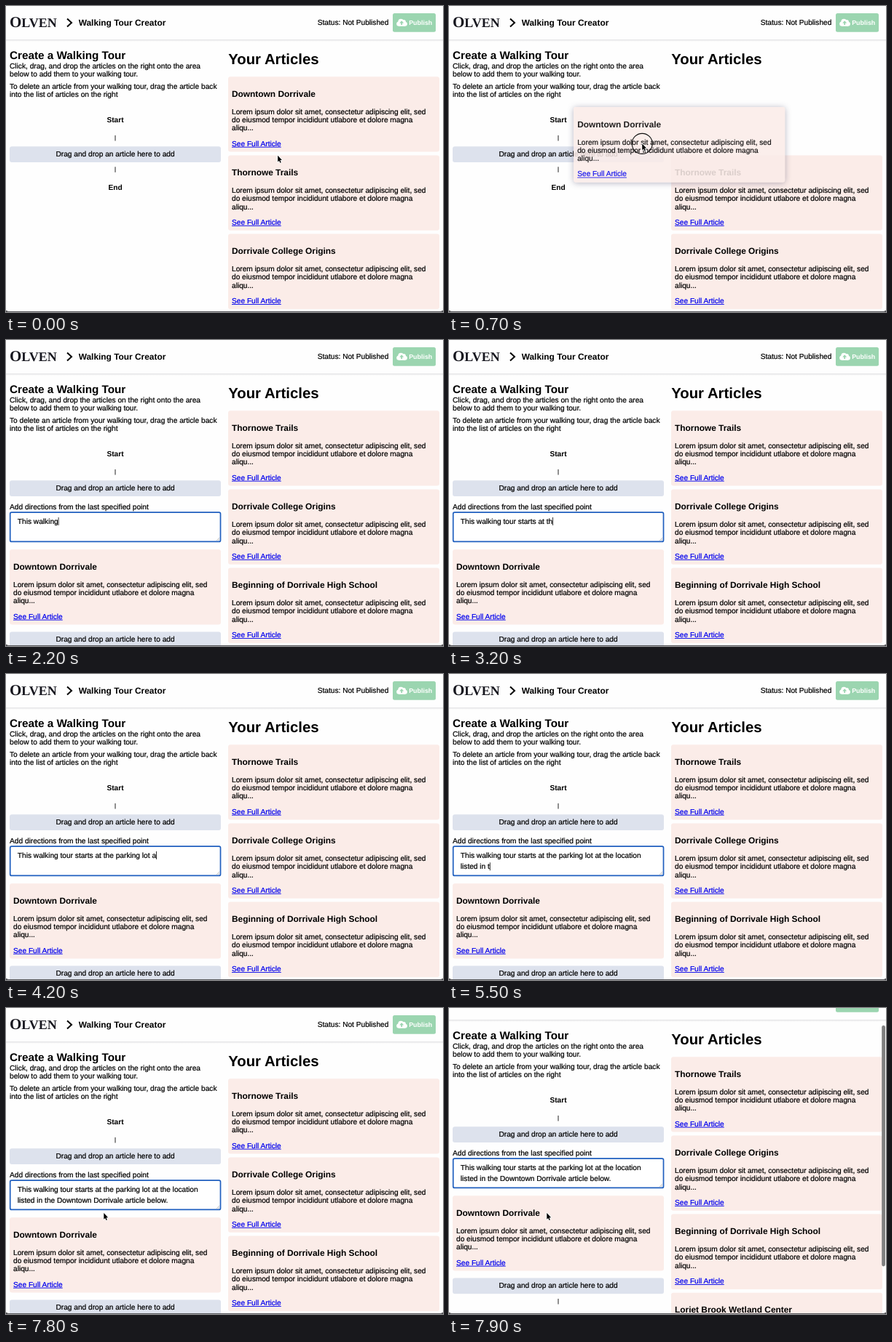
Recreate the animation shown at these times as an HTML page with a canvas. Size 600 by 421 pixels, loop 8000 ms.

```html
<!DOCTYPE html>
<html lang="en">
<head>
<meta charset="utf-8">
<title>Walking Tour Creator</title>
<style>
html, body { margin: 0; width: 100%; height: 100%; overflow: hidden; background: #fefefe; }
canvas { display: block; }
</style>
</head>
<body>
<canvas id="stage" width="600" height="421"></canvas>
<script>
const ctx = document.getElementById('stage').getContext('2d');
const LOOP = 8000;
const SANS = '"Liberation Sans", Arial, sans-serif';
const SERIF = '"Liberation Serif", serif';
const BODY = 10.17, TITLE = 11.9;
const COLORS = { page: '#fefefe', card: '#fbece8', zone: '#dde2ed', link: '#0000ee', focus: '#1f5fbf', button: '#9bd5b0' };

const ARTICLES = [
  'Downtown Dorrivale',
  'Thornowe Trails',
  'Dorrivale College Origins',
  'Beginning of Dorrivale High School',
  'Loriet Brook Wetland Center'
];
const LOREM = [
  'Lorem ipsum dolor sit amet, consectetur adipiscing elit, sed',
  'do eiusmod tempor incididunt utlabore et dolore magna',
  'aliqu...'
];
const LINE1 = 'This walking tour starts at the parking lot at the location ';
const LINE2 = 'listed in the Downtown Dorrivale article below.';

// [time, value...] keys, linear in between
const TYPED = [[1700, 0], [2200, 12], [3900, 44], [4100, 44], [4200, 45], [5000, 60], [5100, 65], [5200, 65],
  [5300, 67], [5500, 71], [5600, 74], [5700, 74], [5900, 78], [6000, 78], [6900, 97], [7600, 107]];
const POINTER = [[0, 373, 206], [200, 399, 148], [300, 392, 150], [700, 265.7, 189.3], [900, 170, 206],
  [1100, 165, 210], [1500, 134, 258], [1700, 134, 258]];
const GRAB = { from: 200, to: 1000, dx: -94, dy: -50.3 };
const FOCUS_AT = 1500, TYPE_AT = 1800, RETURN_AT = 7800, SCROLL_AT = 7900;

function track(keys, t) {
  if (t <= keys[0][0]) return keys[0].slice(1);
  for (let i = 1; i < keys.length; i++) {
    const a = keys[i - 1], b = keys[i];
    if (t <= b[0]) {
      const k = (t - a[0]) / (b[0] - a[0]);
      return a.slice(1).map((v, j) => v + (b[j + 1] - v) * k);
    }
  }
  return keys[keys.length - 1].slice(1);
}

// A hairline stroke gives the slightly heavier weight of smoothed text
function text(str, x, y, { size = BODY, bold = false, color = '#000', align = 'left', face = SANS } = {}) {
  ctx.font = `${bold ? 'bold ' : ''}${size}px ${face}`;
  ctx.textAlign = align;
  ctx.fillStyle = color;
  ctx.fillText(str, x, y);
  if (!bold) {
    ctx.strokeStyle = color;
    ctx.lineWidth = 0.22;
    ctx.strokeText(str, x, y);
  }
  return ctx.measureText(str).width;
}

function box(x, y, w, h, r, fill, stroke, weight = 1) {
  ctx.beginPath();
  ctx.roundRect(x, y, w, h, r);
  if (fill) { ctx.fillStyle = fill; ctx.fill(); }
  if (stroke) { ctx.strokeStyle = stroke; ctx.lineWidth = weight; ctx.stroke(); }
}

// Shadow around a card only, so it does not show through the card
function cardShadow(x, y) {
  ctx.save();
  ctx.beginPath();
  ctx.rect(0, 0, 600, 421);
  ctx.roundRect(x, y, 290, 103.3, 3);
  ctx.clip('evenodd');
  ctx.shadowColor = 'rgba(70, 65, 100, 0.4)';
  ctx.shadowBlur = 9;
  ctx.shadowOffsetY = 1;
  box(x, y, 290, 103.3, 3, COLORS.card);
  ctx.restore();
}

function card(x, y, title, lifted) {
  ctx.save();
  if (lifted) {
    cardShadow(x, y);
    ctx.globalAlpha = 0.87;
  }
  box(x, y, 290, 103.3, 3, COLORS.card);
  text(title, x + 5, y + 27.6, { size: TITLE, bold: true });
  LOREM.forEach((line, i) => text(line, x + 5, y + 51.5 + i * 11.3));
  const w = text('See Full Article', x + 5, y + 95.4, { color: COLORS.link });
  ctx.fillRect(x + 5, y + 96.5, w, 0.9);
  ctx.restore();
}

function tick(y) {
  ctx.fillStyle = '#222';
  ctx.fillRect(149.5, y, 1, 7.5);
}

function dropZone(y) {
  box(5, y, 290, 21.7, 3, COLORS.zone);
  text('Drag and drop an article here to add', 150, y + 13.4, { align: 'center' });
}

function header() {
  const shade = ctx.createLinearGradient(0, 46, 0, 49);
  shade.addColorStop(0, '#e2e2e4');
  shade.addColorStop(1, COLORS.page);
  ctx.fillStyle = shade;
  ctx.fillRect(0, 46, 600, 3);

  const logo = { bold: true, face: SERIF, color: '#17171f' };
  const w = text('O', 5, 29, { ...logo, size: 21 });
  text('LVEN', 5 + w, 29, { ...logo, size: 18 });

  ctx.strokeStyle = '#000';
  ctx.lineWidth = 2;
  ctx.beginPath();
  ctx.moveTo(84, 17.5);
  ctx.lineTo(90, 23);
  ctx.lineTo(84, 28.5);
  ctx.stroke();

  text('Walking Tour Creator', 99.7, 27.2, { size: TITLE, bold: true });
  text('Status: Not Published', 427.7, 26);
  box(531, 10, 59, 25.7, 2.5, COLORS.button);
  cloud();
  text('Publish', 553.2, 26, { size: 8.9, bold: true, color: '#fff' });
}

function cloud() {
  ctx.fillStyle = '#fff';
  for (const [x, y, r] of [[539.4, 24.6, 3.2], [542.2, 21.6, 3.9], [546.2, 21.8, 2.7], [547.9, 24.8, 3]]) {
    ctx.beginPath();
    ctx.arc(x, y, r, 0, 7);
    ctx.fill();
  }
  ctx.fillRect(539.4, 22, 8.5, 5.8);
  ctx.fillStyle = COLORS.button;
  ctx.beginPath();
  ctx.moveTo(543.2, 20.2);
  ctx.lineTo(546.2, 23.4);
  ctx.lineTo(540.2, 23.4);
  ctx.fill();
  ctx.fillRect(542.3, 23, 1.8, 3);
}

function intro() {
  text('Create a Walking Tour', 5, 73, { size: 15.26, bold: true });
  text('Click, drag, and drop the articles on the right onto the area', 5, 86);
  text('below to add them to your walking tour.', 5, 97.1);
  text('To delete an article from your walking tour, drag the article back', 5, 113.8);
  text('into the list of articles on the right', 5, 125);
  text('Start', 150, 160.4, { bold: true, align: 'center' });
  tick(178);
  dropZone(193.2);
  text('Your Articles', 305.2, 79.6, { size: 20.35, bold: true });
}

function endMark(y) {
  tick(y);
  text('End', 150, y + 31.8, { bold: true, align: 'center' });
}

function directions(t) {
  text('Add directions from the last specified point', 5, 233.2);
  const focused = t >= FOCUS_AT;
  box(5.7, 237.2, 288.8, 40.2, 2, '#fff', focused ? COLORS.focus : '#8a8a8a', focused ? 1.7 : 0.7);
  ctx.strokeStyle = '#888';
  ctx.lineWidth = 0.5;
  ctx.beginPath();
  for (const d of [2, 4]) {
    ctx.moveTo(293 - d, 276);
    ctx.lineTo(293, 276 - d);
  }
  ctx.stroke();

  const count = Math.floor(track(TYPED, Math.floor(t / 100) * 100)[0] + 1e-6);
  const second = count > LINE1.length;
  let w = text(LINE1.slice(0, count), 15.8, 252.6);
  if (second) w = text(LINE2.slice(0, count - LINE1.length), 15.8, 268);
  if (focused && t < RETURN_AT) {
    ctx.fillStyle = '#000';
    ctx.fillRect(15.8 + w, second ? 259.3 : 244, 0.8, 11);
  }
}

function pointer(x, y, pressed) {
  if (pressed) {
    ctx.beginPath();
    ctx.arc(x, y, 14, 0, 7);
    ctx.strokeStyle = '#111';
    ctx.lineWidth = 1.1;
    ctx.stroke();
  }
  ctx.beginPath();
  [[0, 0], [0, 8.8], [1.9, 7], [3.2, 10.1], [4.6, 9.5], [3.3, 6.4], [5.8, 6.2]]
    .forEach(([dx, dy]) => ctx.lineTo(x + dx, y + dy));
  ctx.closePath();
  ctx.strokeStyle = '#fff';
  ctx.lineWidth = 1.4;
  ctx.stroke();
  ctx.fillStyle = '#000';
  ctx.fill();
}

function draw(t) {
  const dropped = t >= GRAB.to, dragging = t >= GRAB.from && !dropped;
  const scrolled = t >= SCROLL_AT;
  const [px, py] = t >= RETURN_AT ? [134.3, 282] : track(POINTER, t);

  ctx.fillStyle = COLORS.page;
  ctx.fillRect(0, 0, 600, 421);
  ctx.save();
  if (scrolled) ctx.translate(0, -30);
  header();
  intro();
  ARTICLES.forEach((title, i) => {
    if (i === 0 && (dragging || dropped)) return;
    card(305, 97.2 + (dropped ? i - 1 : i) * 108.2, title);
  });
  if (dropped) {
    directions(t);
    card(5, 288.2, ARTICLES[0]);
    dropZone(401.5);
    endMark(430);
  } else {
    endMark(221.3);
  }
  ctx.restore();

  if (dragging) card(px + GRAB.dx, py + GRAB.dy, ARTICLES[0], true);
  if (scrolled) box(594.2, 24, 4.8, 331.5, 2.4, '#7f7f7f');
  if (t < TYPE_AT || t >= RETURN_AT) pointer(px, py, dragging || (t >= FOCUS_AT && t < FOCUS_AT + 100));

  // window edge
  ctx.fillStyle = '#5a5a5e';
  ctx.fillRect(0, 420, 600, 1);
  ctx.fillRect(0, 419, 2, 1);
  ctx.fillRect(598, 419, 2, 1);
}

ctx.textRendering = 'geometricPrecision';
const start = performance.now();
function loop() {
  draw((performance.now() - start) % LOOP);
  requestAnimationFrame(loop);
}
loop();
</script>
</body>
</html>
```
